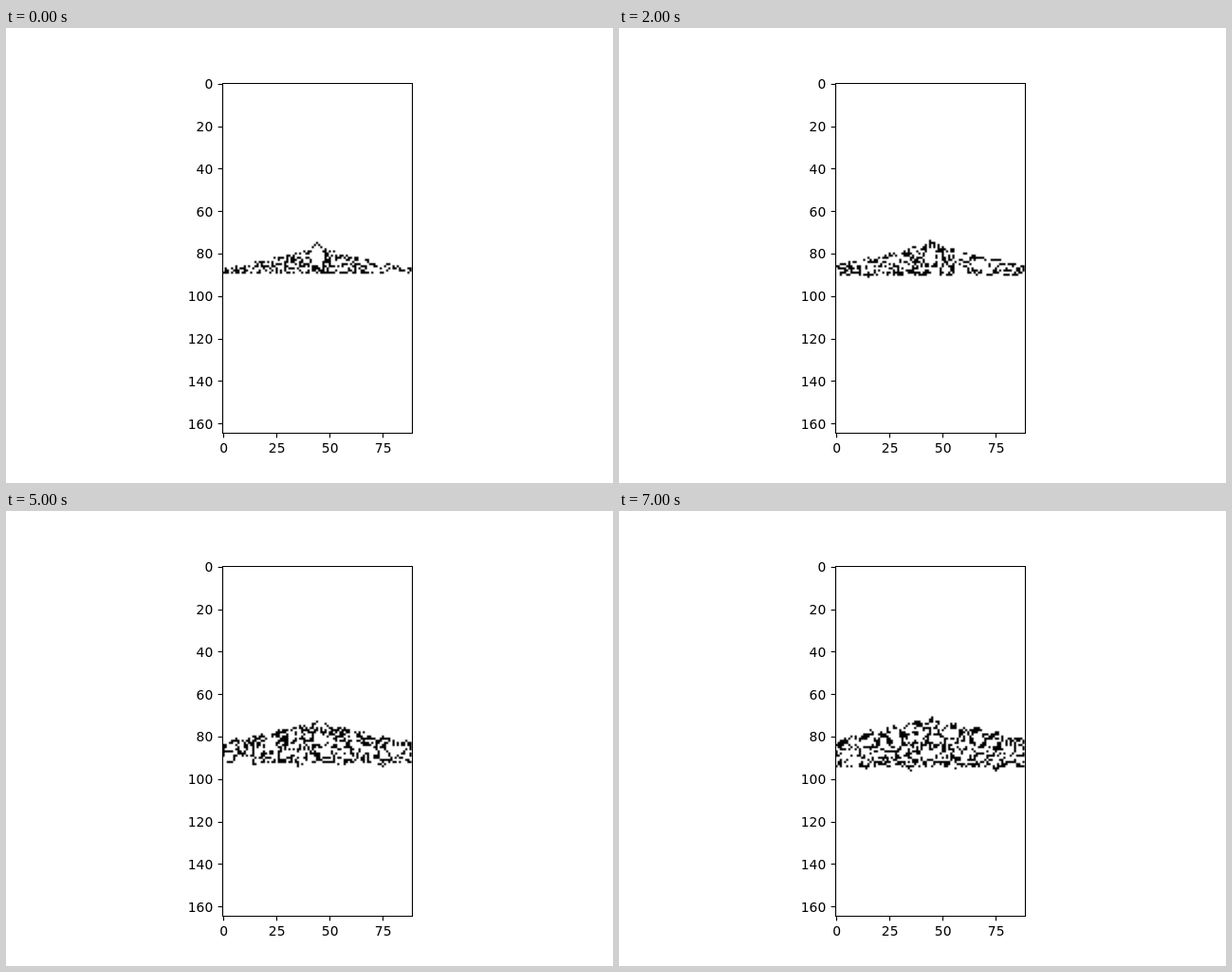
An HTML page with a canvas for the animation above (8 s loop, 640x480 px).

```html
<!DOCTYPE html>
<html lang="en">
<head>
<meta charset="utf-8">
<style>
  html, body { margin: 0; width: 100%; height: 100%; overflow: hidden; background: #fff; }
  canvas, svg { position: absolute; left: 0; top: 0; }
  path { fill: none; stroke: #000; stroke-width: 1.11; }
  text { font: 13.89px "DejaVu Sans", sans-serif; letter-spacing: 0.16px; }
</style>
</head>
<body>
<canvas id="cells" width="640" height="480"></canvas>
<svg id="axes" width="640" height="480"></svg>
<script>
const COLS = 89, ROWS = 165, STEPS = 8, STEP_MS = 1000;
const CELL = 2.24, LEFT = 228.3, TOP = 57.6, MIDDLE = 44;

// Axes
const line = d => `<path d="${d}"/>`;
const label = (x, y, anchor, value) =>
  `<text x="${x}" y="${y}" text-anchor="${anchor}">${value}</text>`;
let marks = line('M228.5 58.5H428.5V427.5H228.5Z');
for (let v = 0; v <= 160; v += 20) {
  const y = TOP + (v + 0.5) * CELL;
  marks += line(`M228.5 ${Math.round(y) + 0.5}h-4.86`);
  marks += label(218.6, Math.floor(y + 5.9), 'end', v);
}
for (let v = 0; v <= 75; v += 25) {
  const x = LEFT + (v + 0.5) * CELL;
  marks += line(`M${Math.round(x) + 0.5} 427.5v4.86`);
  marks += label(x + 0.4, 448, 'middle', v);
}
document.getElementById('axes').innerHTML = marks;

// The colony swells from a pointed roof into a bumpy dome, with roots below
function inside(x, y, step) {
  const side = Math.abs(x - MIDDLE) / MIDDLE, progress = step / (STEPS - 1);
  const roof = 75 + 12 * side ** 0.6;
  const dome = 72 + 10 * side - Math.cos(2 * Math.PI * (x - 46) / 10);
  const root = Math.max(0, Math.cos(2 * Math.PI * (x - 15) / 20)) ** 4;
  const top = roof + (dome - roof) * progress;
  const bottom = 89 + step * (0.75 + 0.25 * root);
  return y >= Math.round(top) && y <= Math.floor(bottom);
}

let seed = 4127;
function random() {
  seed = (Math.imul(seed, 1664525) + 1013904223) >>> 0;
  return seed / 2 ** 32;
}

const at = (grid, x, y) =>
  x < 0 || y < 0 || x >= COLS || y >= ROWS ? 0 : grid[y * COLS + x];

function makeGrid(rule) {
  return Uint8Array.from({ length: COLS * ROWS },
    (_, i) => rule(i % COLS, Math.floor(i / COLS)) ? 1 : 0);
}

// Random cells with a bare patch under the peak
function firstGrid() {
  return makeGrid((x, y) => {
    if (!inside(x, y, 0)) return false;
    const offset = Math.abs(x - MIDDLE);
    if (offset < 3 && y < 86) return y === 75 + offset;
    return random() < 0.42;
  });
}

// Maze-like rule: born with 3 neighbours, survives with 1 to 3
function nextGrid(grid, step) {
  return makeGrid((x, y) => {
    if (!inside(x, y, step)) return false;
    if (!inside(x, y, step - 1)) return random() < 0.45;
    let n = -at(grid, x, y);
    for (let dy = -1; dy <= 1; dy++)
      for (let dx = -1; dx <= 1; dx++) n += at(grid, x + dx, y + dy);
    return at(grid, x, y) ? n >= 1 && n <= 3 : n === 3;
  });
}

const grids = [firstGrid()];
for (let s = 1; s < STEPS; s++) grids.push(nextGrid(grids[s - 1], s));

// Cells are enlarged with a raised-cosine blend between neighbours
const ctx = document.getElementById('cells').getContext('2d');
const image = ctx.createImageData(199, 368);

function sample(pixel, origin) {
  const pos = (pixel + 0.5 - origin) / CELL - 0.5, cell = Math.floor(pos);
  return [cell, 0.5 - 0.5 * Math.cos(Math.PI * (pos - cell))];
}

function draw(grid) {
  for (let py = 0; py < image.height; py++) {
    const [y, v] = sample(py + 59, TOP);
    for (let px = 0; px < image.width; px++) {
      const [x, u] = sample(px + 229, LEFT);
      const upper = at(grid, x, y) * (1 - u) + at(grid, x + 1, y) * u;
      const lower = at(grid, x, y + 1) * (1 - u) + at(grid, x + 1, y + 1) * u;
      image.data[(py * image.width + px) * 4 + 3] = 255 * (upper * (1 - v) + lower * v);
    }
  }
  ctx.putImageData(image, 229, 59);
}

let shown = -1;
function frame() {
  const step = Math.floor(performance.now() / STEP_MS) % STEPS;
  if (step !== shown) draw(grids[shown = step]);
  requestAnimationFrame(frame);
}
frame();
</script>
</body>
</html>
```
